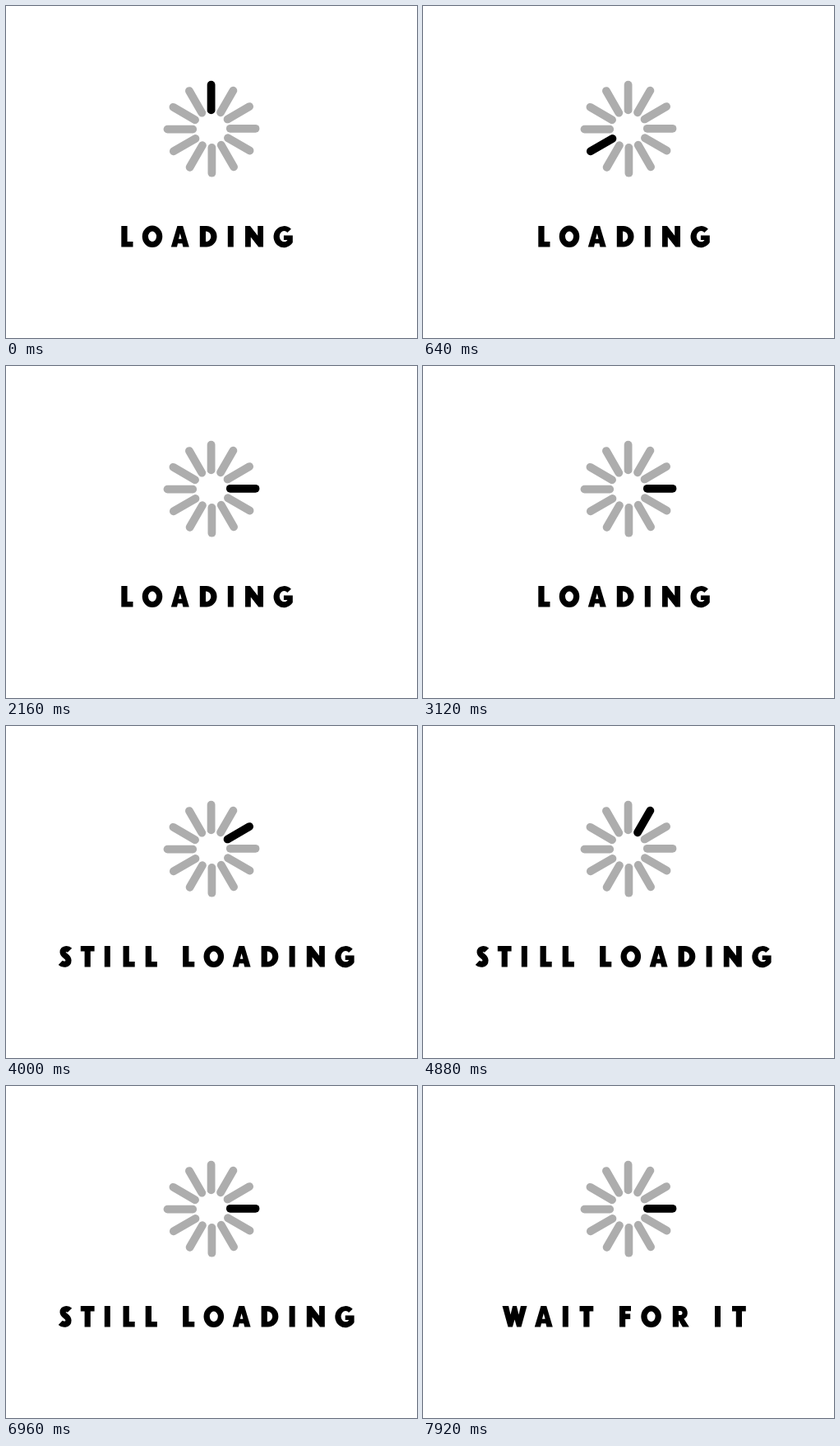
An HTML page with a canvas for the animation above (8 s loop, 500 by 403 pixels).

```html
<!DOCTYPE html>
<html lang="en">
<head>
<meta charset="utf-8">
<title>Loading</title>
<style>
html, body { margin: 0; width: 100%; height: 100%; overflow: hidden; background: #fff; }
canvas { display: block; width: 500px; height: 403px; }
</style>
</head>
<body>
<canvas id="stage" width="500" height="403" role="img">LOADING</canvas>
<script>
const canvas = document.getElementById('stage');
const ctx = canvas.getContext('2d');

const STEP = 80, BARS = 12, LOOP = 8000;
const TURN = STEP * BARS;
const TEXT_TOP = 267;

// Filled letters, 25.5 units tall
const FILLED = {
  L: 'M0 0H7.3V19H14.2V25.5H0Z',
  A: 'M0 25.5L7.6 0H14.4L22 25.5H14.6L13.6 21.3H8.2L7.2 25.5ZM9.2 15.8H12.8L11 9Z',
  D: 'M0 0H8A12.75 12.75 0 0 1 8 25.5H0ZM7.2 6.4V19.1A6.35 6.35 0 0 0 7.2 6.4Z',
  I: 'M0 0H7V25.5H0Z',
  N: 'M0 25.5V0H6L15.2 11.8V0H22V25.5H16.2L6.8 13.5V25.5Z',
  T: 'M0 0H16.8V6.4H12V25.5H4.8V6.4H0Z',
  W: 'M0 0H7.6L10 10.5L12.6 0H17.4L20 10.5L22.4 0H30L23 25.5H17.6L15 16.5L12.4 25.5H7Z',
  F: 'M0 0H14V6.3H7.2V9.6H13.2V16H7.2V25.5H0Z',
  R: 'M0 0H10A8.3 8.3 0 0 1 13.6 15.6L20 25.5H12L7.2 17.2V25.5H0ZM7.2 5.9V10.9H9.2A2.5 2.5 0 0 0 9.2 5.9Z',
  O: 'M12.7 -.4A12.3 13.2 0 0 1 12.7 26A12.3 13.2 0 0 1 12.7 -.4ZM12.7 6.6A5 6.2 0 0 0 12.7 19A5 6.2 0 0 0 12.7 6.6Z',
  G: 'M21.5 3.8A12.6 13 0 1 0 23.4 20V11.5H12.5V17H16.8V17.4A5.6 6.6 0 1 1 16.9 8Z'
};

const glyphs = {};
for (const k in FILLED) glyphs[k] = { path: new Path2D(FILLED[k]) };
// S is a single heavy stroke
glyphs.S = {
  path: new Path2D('M12.6 5.2C10.5 3 3.8 2.6 4.1 7.6C4.3 12 11 12.6 11 17.6C11 23.2 4 23 1.2 20.4'),
  stroked: true
};

const LOADING_X = [140.3, 165.3, 200.8, 235.8, 269.8, 291, 325.4];
const LABELS = [
  { text: 'LOADING', x: LOADING_X },
  { text: 'STILL LOADING', x: [65, 90.8, 119.8, 142.5, 169.7, 0, ...LOADING_X.map(x => x + 74.8)] },
  { text: 'WAIT FOR IT', x: [96.5, 135.8, 169.8, 190.5, 0, 239, 264.9, 303.8, 0, 355, 376] }
];

function drawLabel({ text, x }) {
  ctx.fillStyle = ctx.strokeStyle = '#000';
  ctx.lineWidth = 7.2;
  ctx.lineCap = 'butt';
  [...text].forEach((ch, i) => {
    const g = glyphs[ch];
    if (!g) return;
    ctx.save();
    ctx.translate(x[i], TEXT_TOP);
    if (g.stroked) ctx.stroke(g.path);
    else ctx.fill(g.path, 'evenodd');
    ctx.restore();
  });
}

function drawSpinner(active) {
  ctx.lineWidth = 9.8;
  ctx.lineCap = 'round';
  for (let i = 0; i < BARS; i++) {
    ctx.save();
    ctx.translate(250, 149.2);
    ctx.rotate(i * 2 * Math.PI / BARS);
    ctx.strokeStyle = i === active ? '#000' : '#adadad';
    ctx.beginPath();
    ctx.moveTo(-0.4, -22.8);
    ctx.lineTo(-0.4, -53.5);
    ctx.stroke();
    ctx.restore();
  }
}

function render(now) {
  const t = now % LOOP;
  const label = LABELS[Math.floor(t / (4 * TURN))];
  ctx.fillStyle = '#fff';
  ctx.fillRect(0, 0, 500, 403);
  drawSpinner(Math.floor(t / STEP) % BARS);
  drawLabel(label);
  if (canvas.getAttribute('aria-label') !== label.text) {
    canvas.setAttribute('aria-label', label.text);
  }
}

const start = performance.now();
function tick() {
  render(performance.now() - start);
  requestAnimationFrame(tick);
}
tick();
</script>
</body>
</html>
```
